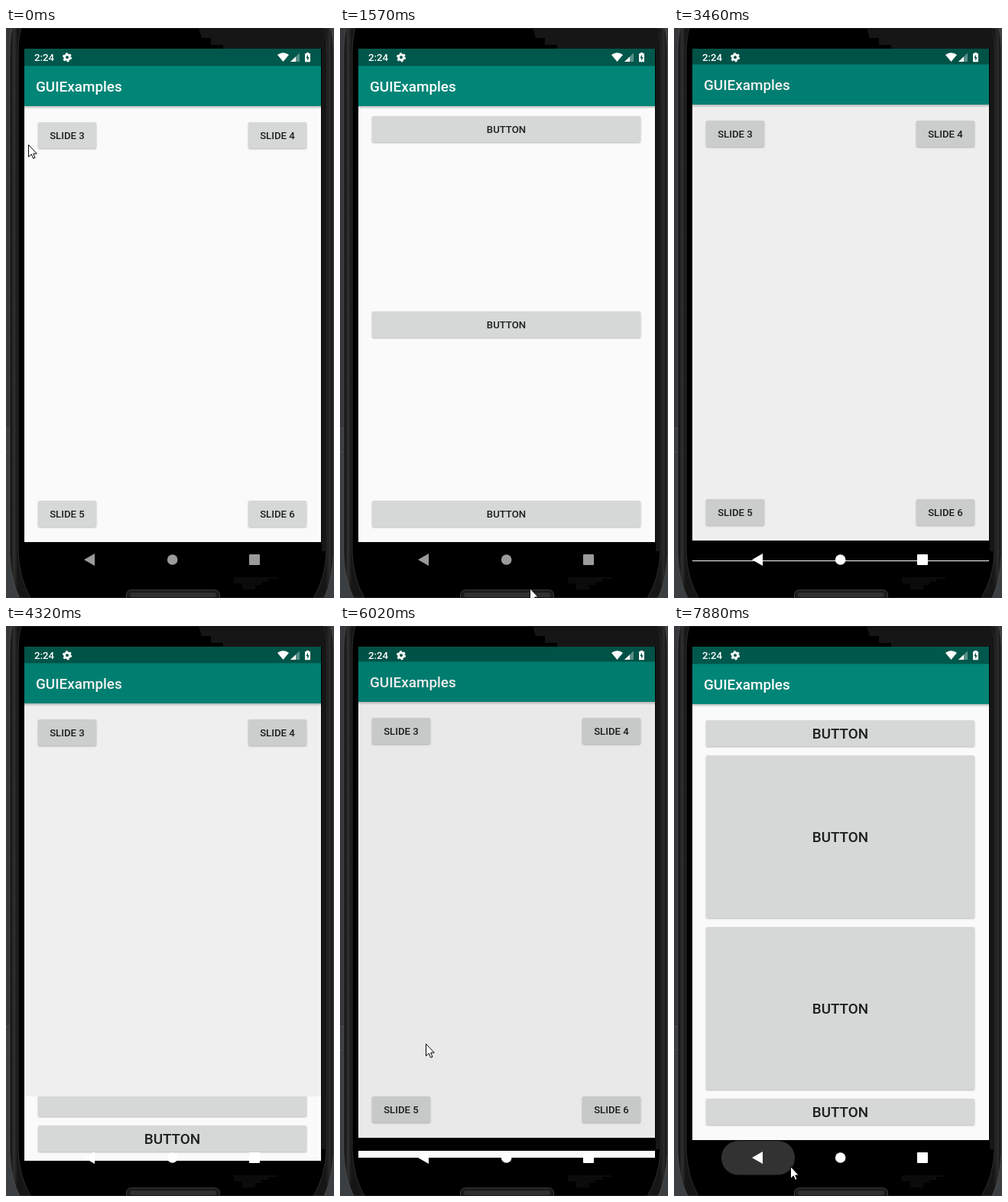
Animation, 429 px wide and 744 px high, one loop 8000 ms. Source, as an HTML page:

```html
<!DOCTYPE html>
<html lang="en">
<head>
<meta charset="utf-8">
<title>Slide transitions</title>
<style>
  html, body { margin: 0; width: 100%; height: 100%; overflow: hidden; background: #000; }
  svg { display: block; width: 429px; height: 744px; }
  text { font-family: Roboto, sans-serif; font-weight: 500; }
  .btn rect { fill: #d6d7d7; filter: drop-shadow(0 1px 1px rgba(0, 0, 0, .28)); }
  .btn text { fill: #1d1e1e; text-anchor: middle; }
</style>
</head>
<body>
<svg viewBox="0 0 429 744">
  <defs>
    <linearGradient id="fade" x2="0" y2="1">
      <stop stop-opacity=".24"/><stop offset="1" stop-opacity="0"/>
    </linearGradient>
    <linearGradient id="side">
      <stop stop-color="#0c0c0c"/><stop offset=".013" stop-color="#303030"/>
      <stop offset=".024" stop-color="#161616"/><stop offset=".976" stop-color="#161616"/>
      <stop offset=".99" stop-color="#2c2c2c"/><stop offset="1" stop-color="#0c0c0c"/>
    </linearGradient>
    <clipPath id="screen"><rect x="24" y="27" width="388" height="690"/></clipPath>
    <clipPath id="reveal"><rect id="revealBox" x="24" width="388" height="744"/></clipPath>
    <clipPath id="pressed"><rect id="pressBox" width="76" height="34" rx="2"/></clipPath>
  </defs>

  <!-- desktop and phone body -->
  <rect width="429" height="744" fill="#3c3f41"/>
  <rect width="9" height="522" fill="#36373a"/>
  <path d="M0 522.5H5M0 553.5H5" stroke="#4a4c4f"/>
  <path d="M8 0Q5 12 5 34V688Q6 722 18 744H416Q427 722 428 688V34Q428 12 425 0Z" fill="url(#side)" stroke="#484848"/>
  <path d="M20 0Q16 12 16 36V684Q17 718 32 744H402Q418 718 419 684V36Q419 12 415 0Z" stroke="#2e2e2e"/>
  <path d="M252 0H415Q418 12 418 36V683H413V27H284V22H268V13H256Z" fill="#161616"/>
  <path d="M298 717H355V719H343V723H334V727H326V733H309V725H298Z" fill="#0b0b0b"/>
  <rect x="157.5" y="733.5" width="122" height="22" rx="6" fill="#1b1b1b" stroke="#3b3b3b"/>
  <rect x="162" y="737" width="113" height="6" rx="3" fill="#303030"/>

  <rect x="24" y="27" width="388" height="690"/>
  <g clip-path="url(#screen)">
    <g id="home"></g>
    <g clip-path="url(#reveal)"><g id="pages"></g></g>
  </g>

  <!-- status bar -->
  <g fill="#fff">
    <text x="37" y="43" font-size="13.2">2:24</text>
    <circle cx="80" cy="38.3" r="3.4" fill="none" stroke="#fff" stroke-width="2.8"/>
    <circle cx="80" cy="38.3" r="5" fill="none" stroke="#fff" stroke-width="2.2" stroke-dasharray="2.6 2.636"/>
    <path d="M355 35Q362.5 29.5 370 35L362.5 44Z"/>
    <path d="M384 32.5V44H372Z" opacity=".35"/>
    <path d="M379 37.5V44H372Z"/>
    <path d="M391 33.3H393V32H396V33.3H398V44.3H391Z"/>
    <path d="M395 34.8L392.3 39.3H394.1V42.8L396.8 38.2H395Z" fill="#00574b"/>
  </g>

  <!-- navigation bar -->
  <rect id="pill" x="62" y="672" width="96" height="44.5" rx="22" fill="#323232"/>
  <g id="nav">
    <path d="M116 686V702L102 694Z"/>
    <circle cx="217.7" cy="694" r="6.8"/>
    <rect x="318" y="687" width="14" height="14" rx="1"/>
  </g>
  <path id="cursor" d="M.5 .5V16.2L4.2 12.8L6.7 18.3L9 17.3L6.7 12H11.3Z" fill="#fff" stroke="#000"/>
</svg>

<script>
const $ = id => document.getElementById(id);
const set = (id, attrs) => {
  for (const name in attrs) $(id).setAttribute(name, attrs[name]);
};
const show = (node, on) => node.style.display = on ? '' : 'none';

const LOOP = 8000, TRIP = 425, PRESS = 400;
const SMALL = 13.2, LARGE = 18.9, ROW = 34, GAP = 12;

const button = (label, x, y, w, h, size) => `<g class="btn">
  <rect x="${x}" y="${y}" width="${w}" height="${h}" rx="2"/>
  <text x="${x + w / 2}" y="${Math.round(y + h / 2 + size * .36)}" font-size="${size}">${label}</text></g>`;

const wide = (y, h, size) => button('BUTTON', 42, y, 351, h, size);

const layout = content => `
  <rect x="24" y="27" width="388" height="644" fill="#fafafa"/>
  <rect x="24" y="102" width="388" height="4" fill="url(#fade)"/>
  <rect x="24" y="27" width="388" height="75" fill="#008577"/>
  <rect x="24" y="27" width="388" height="22.5" fill="#00574b"/>
  <text x="39" y="83" font-size="${LARGE}" fill="#fff">GUIExamples</text>${content}`;

const stack = (y, heights) => heights.map(h => {
  const row = wide(y, h, LARGE);
  y += h + GAP;
  return row;
}).join('');

const corner = i => ({ x: i % 2 ? 317 : 42, y: i < 2 ? 123 : 617 });
const slides = [0, 1, 2, 3].map(i => button('SLIDE ' + (i + 3), corner(i).x, corner(i).y, 76, ROW, SMALL));
$('home').innerHTML = layout(slides.join('')) + '<circle id="ripple" clip-path="url(#pressed)"/>';

$('pages').innerHTML = [
  [115, 370, 617].map(y => wide(y, ROW, SMALL)).join(''),
  stack(115, [ROW, 452, ROW]),
  stack(123, [ROW, 212, 212, ROW])
].map(content => `<g>${layout(content)}</g>`).join('');

// When each page opens, when back is pressed and when the page closes
const visits = [
  { open: 1100, back: 2720, close: 3170 },
  { open: 4268, back: 5500, close: 5793 },
  { open: 7010, back: 7500, close: Infinity }
];

// Pointer runs through [time, x, y]; the pointer is hidden between runs
const runs = [
  [[0, 29, 152], [150, 29, 152], [620, 66, 146]],
  [[1250, 120, 300], [1520, 248, 731], [2650, 112, 697], [2950, 112, 697], [3220, 337, 276], [3400, 354, 160]],
  [[4520, 26, 590], [4620, 57, 685], [4950, 107, 695], [5700, 107, 695], [6020, 112, 545], [6450, 82, 630]],
  [[7320, 70, 660], [7600, 113, 694], [7800, 113, 694], [7820, 152, 705], [LOOP, 152, 705]]
];

const clamp = v => Math.min(1, Math.max(0, v));
const mix = (a, b, p) => a + (b - a) * p;
const curve = (a, b, s) => 3 * a * s * (1 - s) ** 2 + 3 * b * s * s * (1 - s) + s ** 3;
const bezier = (x1, y1, x2, y2) => x => {
  let lo = 0, hi = 1;
  for (let i = 0; i < 24; i++) {
    const mid = (lo + hi) / 2;
    if (curve(x1, x2, mid) < x) lo = mid; else hi = mid;
  }
  return curve(y1, y2, lo);
};
const glide = bezier(.4, 0, .2, 1);
const rush = bezier(.3, 0, .8, .15), settle = bezier(.05, .7, .1, 1);
const wipe = x => x < 1 / 6 ? .4 * rush(x * 6) : mix(.4, 1, settle((x - 1 / 6) * 1.2));

function drawWindows(t) {
  const index = visits.findIndex(v => t >= v.open && t < v.close + TRIP);
  [...$('pages').children].forEach((page, i) => show(page, i === index));
  let shown = 0, alpha = 1;
  if (index >= 0) {
    const { open, close } = visits[index];
    const closing = t >= close;
    const age = t - (closing ? close : open);
    const x = clamp(age / TRIP);
    shown = closing ? 1 - glide(x) : glide(x);
    alpha = closing ? mix(.9, 1, clamp((age - 190) / 117)) : mix(1, .9, clamp(age / 117));
    const cut = closing ? wipe(x) : 1 - wipe(x);
    const drop = Math.round(28.3 * (1 - shown));
    set('pages', { transform: `translate(0 ${drop})` });
    set('revealBox', { y: Math.round(27 + drop + cut * 661.7) });
  }
  set('home', { transform: `translate(0 ${Math.round(-13.8 * shown)})`, opacity: alpha });
}

function drawRipple(t) {
  const index = visits.findIndex(v => t >= v.open - PRESS && t < v.open);
  show($('ripple'), index >= 0);
  if (index < 0) return;
  const age = t - visits[index].open + PRESS;
  const { x, y } = corner(index);
  set('pressBox', { x, y });
  set('ripple', {
    cx: x + 38, cy: y + 17,
    r: mix(12, 46, glide(clamp(age / 230))),
    opacity: .14 * clamp((PRESS - age) / 120)
  });
}

function drawPointer(t) {
  const run = runs.find(r => t >= r[0][0] && t <= r[r.length - 1][0]);
  show($('cursor'), run);
  if (!run) return;
  const i = Math.max(1, run.findIndex(key => key[0] >= t));
  const [t0, x0, y0] = run[i - 1], [t1, x1, y1] = run[i];
  const p = (t - t0) / (t1 - t0);
  set('cursor', { transform: `translate(${Math.round(mix(x0, x1, p))} ${Math.round(mix(y0, y1, p))})` });
}

const refresh = time => Math.max(0, Math.floor((time - 20) / 100) * 100 + 20);

function draw(now) {
  const t = refresh(now % LOOP);
  drawWindows(t);
  drawRipple(t);
  drawPointer(t);
  show($('pill'), visits.some(v => t >= v.back && t < v.back + 300));
  if (t >= visits[2].back) show($('pill'), true);
  set('nav', { fill: t < visits[0].back ? '#9b9b9b' : '#fff' });
}

const start = performance.now();
function loop() {
  draw(performance.now() - start);
  requestAnimationFrame(loop);
}
loop();
</script>
</body>
</html>
```
